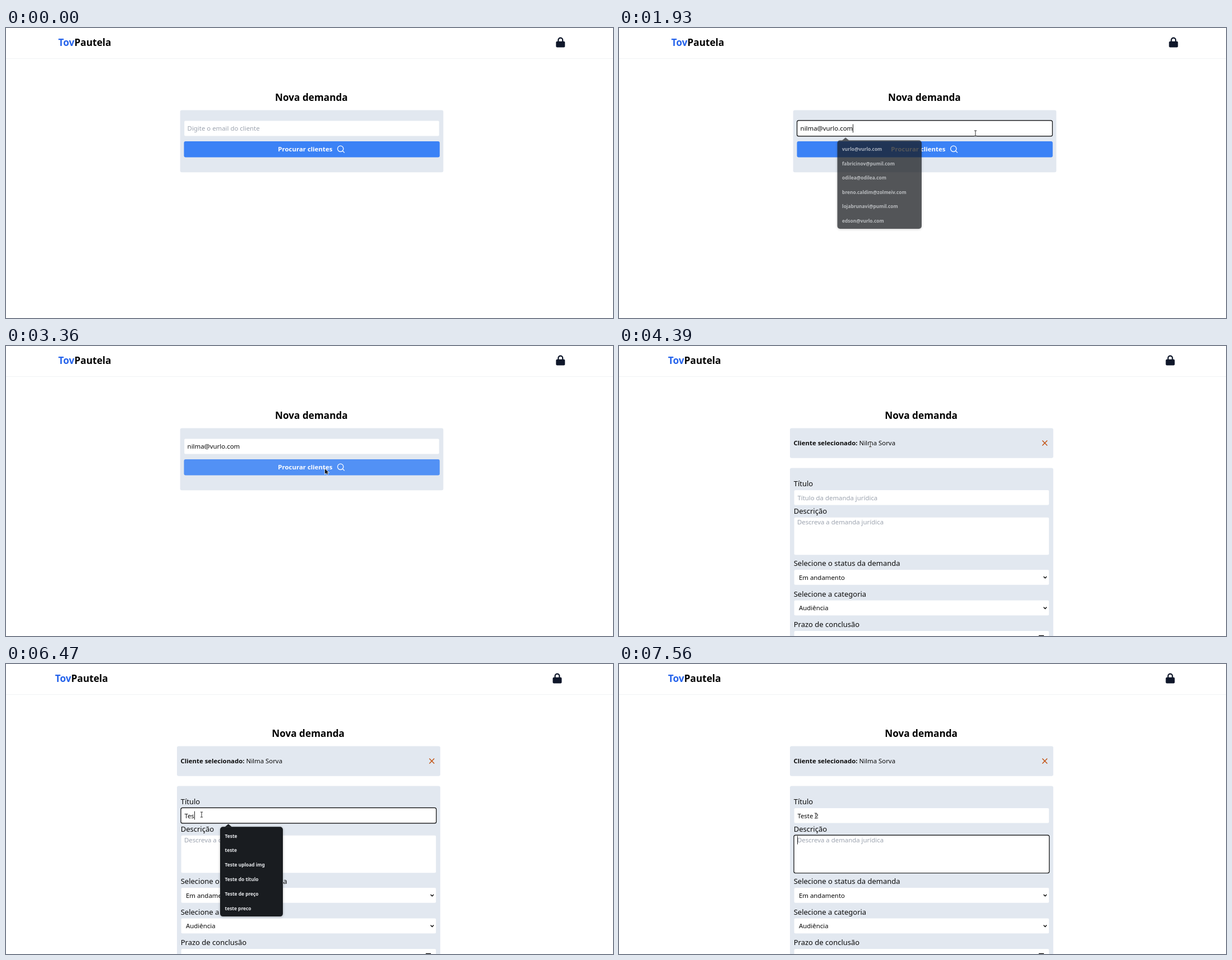
These frames come from a looping animation (1083 by 517 pixels, 8 s). An HTML page with a canvas:

```html
<!DOCTYPE html>
<html lang="pt-BR">
<head>
<meta charset="utf-8">
<title>Nova demanda</title>
<style>
  html, body { margin: 0; width: 100%; height: 100%; overflow: hidden; background: #fff; }
  canvas { display: block; }
</style>
</head>
<body>
<canvas id="stage" width="1083" height="517"></canvas>
<script>
const ctx = document.getElementById('stage').getContext('2d');
const LOOP = 8000, NEXT_PAGE = 3440;
const CARD = '#e2e8f0', HINT = '#9ca3af', INK = '#0a0a0a';
const EMAIL = 'nilma@vurlo.com';
const EMAIL_LIST = ['vurlo@vurlo.com', 'fabricinov@pumil.com', 'odilea@odilea.com',
  'breno.caldim@zolmeiv.com', 'lojabrunavi@pumil.com', 'edson@vurlo.com'];
const TITLE_LIST = ['Teste', 'teste', 'Teste upload img', 'Teste do título', 'Teste de preço', 'teste preco'];
const TITLE = 'Teste 2', TITLE_KEYS = [5830, 6260, 6470, 6620, 6680, 6900, 7000];

// Mouse path: time, x, y
const PATH = [
  [290, 991, 481], [420, 698, 268], [700, 698, 268], [770, 600, 258], [840, 494, 240],
  [915, 560, 238], [990, 636, 187.5], [2080, 636, 187.5], [2400, 590, 207], [2650, 569, 219],
  [3860, 569, 219], [4120, 495, 149], [4390, 448.5, 175], [4660, 409, 234], [4730, 408, 235],
  [5110, 349, 268.5], [7150, 349, 268.5], [7200, 351, 270.5]
];

const ramp = (t, a, b) => Math.min(1, Math.max(0, (t - a) / (b - a)));
const inside = (x, y, l, t, r, b) => x >= l && x <= r && y >= t && y <= b;

function box(x, y, w, h, r, fill) {
  ctx.beginPath();
  ctx.roundRect(x, y, w, h, r);
  ctx.fillStyle = fill;
  ctx.fill();
}

function text(str, x, y, size = 11.4, color = INK, weight = 400) {
  ctx.font = `${weight} ${size}px "Noto Sans", "Open Sans", sans-serif`;
  ctx.fillStyle = color;
  ctx.fillText(str, x, y);
  return x + ctx.measureText(str).width;
}

function line(points, color, width) {
  ctx.beginPath();
  points.forEach(([x, y]) => ctx.lineTo(x, y));
  ctx.strokeStyle = color;
  ctx.lineWidth = width;
  ctx.stroke();
}

function field(x, y, h, focused) {
  box(x, y, 454.5, h, 2, '#fff');
  if (!focused) return;
  ctx.beginPath();
  ctx.roundRect(x - .6, y - .6, 455.7, h + 1, 3);
  ctx.strokeStyle = '#000';
  ctx.lineWidth = 1.15;
  ctx.stroke();
}

function caret(t, since, x, y) {
  if ((t - since) % 1000 < 500) box(Math.round(x), y, 1, 15, 0, '#222');
}

function header(dx) {
  box(0, 54, 1083, 1, 0, '#f1f3f5');
  const x = text('Tov', 93.2 + dx, 32, 17.2, '#2563eb', 700);
  text('Pautela', x, 32, 17.2, '#000', 700);
  box(981.3 + dx, 23.8, 16, 10.8, 2, '#0f172a');
  ctx.beginPath();
  ctx.moveTo(985.4 + dx, 25);
  ctx.lineTo(985.4 + dx, 21.6);
  ctx.arc(989.3 + dx, 21.6, 3.9, Math.PI, 0);
  ctx.lineTo(993.2 + dx, 25);
  ctx.strokeStyle = '#0f172a';
  ctx.lineWidth = 2.2;
  ctx.stroke();
  text('Nova demanda', 480 + dx, 129.5, 17.2, '#000', 700);
}

function popup(x, y, w, h, rows, step, alpha) {
  if (alpha <= 0) return;
  ctx.save();
  ctx.globalAlpha = alpha;
  ctx.shadowColor = 'rgba(0,0,0,.25)';
  ctx.shadowBlur = 4;
  ctx.shadowOffsetY = 1;
  box(x, y, w, h, 5, '#191c20');
  ctx.shadowColor = 'transparent';
  ctx.beginPath();
  ctx.moveTo(x + 8.5, y + .2);
  ctx.lineTo(x + 14.7, y - 5);
  ctx.lineTo(x + 21, y + .2);
  ctx.fill();
  rows.forEach((row, i) => text(row, x + 8.6, y + 19.2 + i * step, 8.4, '#e8eaed', 600));
  ctx.restore();
}

function searchPage(t) {
  header(0);
  box(310.7, 146.5, 469.6, 110.7, 3, CARD);
  const focused = t >= 1310 && t < 2870, filled = t >= 1870;
  field(318.2, 165.5, 27, focused);
  const end = text(filled ? EMAIL : 'Digite o email do cliente', 323.6, 183.4, 11.4, filled ? INK : HINT);
  if (focused) caret(t, filled ? 1870 : 1310, filled ? end : 323.5, 171.5);

  box(317.5, 202, 456.3, 28.4, 3, t >= 3360 ? '#5291f5' : '#3b82f6');
  text('Procurar clientes', 485.3, 220.4, 11.45, '#fff', 700);
  ctx.beginPath();
  ctx.arc(596.8, 215.3, 5.2, 0, 7);
  ctx.strokeStyle = '#fff';
  ctx.lineWidth = 1.3;
  ctx.stroke();
  line([[600.5, 219], [604, 222.4]], '#fff', 1.3);

  const alpha = filled ? 1 - ramp(t, 1870, 2065) : ramp(t, 1250, 1500) * (t >= 1310);
  popup(389.5, 200.2, 150.5, 157.8, EMAIL_LIST, 25.5, alpha);
}

function select(label, value, y) {
  text(label, 311.7, y - 6.7, 13);
  field(312.6, y, 26.7);
  text(value, 321, y + 17.5, 11.4);
  line([[757.6, y + 12], [760.3, y + 14.8], [763, y + 12]], '#000', 1.4);
}

function formPage(t) {
  header(-5.8);
  box(305, 146.5, 469.8, 53.2, 3, CARD);
  const x = text('Cliente selecionado: ', 311.6, 177.2, 11.4, INK, 700);
  text('Nilma Sorva', x, 177.2);
  line([[755.3, 168.6], [764.1, 177.4]], '#c2500f', 1.4);
  line([[755.3, 177.4], [764.1, 168.6]], '#c2500f', 1.4);

  box(305, 217.5, 469.8, 320, 3, CARD);
  const onTitle = t >= 5330 && t < 7560, onBody = t >= 7560;
  const typed = TITLE_KEYS.filter(key => t >= key);
  const value = TITLE.slice(0, typed.length);
  text('Título', 311.7, 250.2, 13);
  field(312.6, 257, 26.5, onTitle);
  const end = text(value || 'Título da demanda jurídica', 318.4, 274.5, 11.4, value ? INK : HINT);
  if (onTitle) caret(t, typed.at(-1) || 5330, value ? end : 318, 262.5);

  text('Descrição', 311.7, 299, 13);
  field(312.6, 305.7, 66.6, onBody);
  text('Descreva a demanda jurídica', 317.9, 318, 11.4, HINT);
  if (onBody) caret(t, 7560, 318.4, 306.5);

  select('Selecione o status da demanda', 'Em andamento', 399);
  select('Selecione a categoria', 'Audiência', 453.6);
  text('Prazo de conclusão', 311.7, 501.2, 13);
  field(312.6, 508, 26.7);
  text('dd/mm/aaaa', 322, 524.6, 11.4);
  line([[749.5, 520], [749.5, 516.4], [757.5, 516.4], [757.5, 520]], '#000', 1.2);

  const shown = t < 5830 ? ramp(t, 5270, 5540) * (t >= 5330) : ramp(t, 5650, 6060);
  popup(382, 290.3, 112, 159.8, TITLE_LIST, 25.8, shown * (1 - ramp(t, 7050, 7330)));
}

function pointer(x, y) {
  ctx.beginPath();
  [[0, 0], [0, 9], [2.2, 7.2], [3.7, 10.2], [5.2, 9.5], [3.8, 6.6], [6.7, 6.4]]
    .forEach(([px, py]) => ctx.lineTo(x + px, y + py));
  ctx.closePath();
  ctx.strokeStyle = '#fff';
  ctx.lineWidth = 1.4;
  ctx.stroke();
  ctx.fillStyle = '#15181c';
  ctx.fill();
}

function beam(x, y) {
  for (const [color, width] of [['rgba(255,255,255,.8)', 2.2], ['#333', 1]]) {
    line([[x, y - 4.5], [x, y + 4.5]], color, width);
    line([[x - 2.2, y - 4.5], [x + 2.2, y - 4.5]], color, width);
    line([[x - 2.2, y + 4.5], [x + 2.2, y + 4.5]], color, width);
  }
}

function busy(x, y) {
  ctx.beginPath();
  ctx.arc(x, y, 7, 0, 7);
  ctx.strokeStyle = '#15181c';
  ctx.lineWidth = 2.5;
  ctx.stroke();
}

function mouse(t) {
  if (t < PATH[0][0]) return;
  const next = PATH.findIndex(p => p[0] > t);
  const b = PATH.at(next), a = next < 0 ? b : PATH[next - 1];
  const k = ramp(t, a[0], b[0] + (a === b));
  const x = a[1] + (b[1] - a[1]) * k, y = a[2] + (b[2] - a[2]) * k;
  const overText = t < NEXT_PAGE
    ? inside(x, y, 318, 165, 773, 193)
    : inside(x, y, 311, 165, 487, 181) || inside(x, y, 312, 256, 768, 284);
  if (t >= 2870 && t < 3080) busy(x, y);
  else (overText ? beam : pointer)(x, y);
}

function draw() {
  const t = performance.now() % LOOP;
  ctx.fillStyle = '#fff';
  ctx.fillRect(0, 0, 1083, 517);
  (t < NEXT_PAGE ? searchPage : formPage)(t);
  mouse(t);
  requestAnimationFrame(draw);
}
draw();
</script>
</body>
</html>
```
